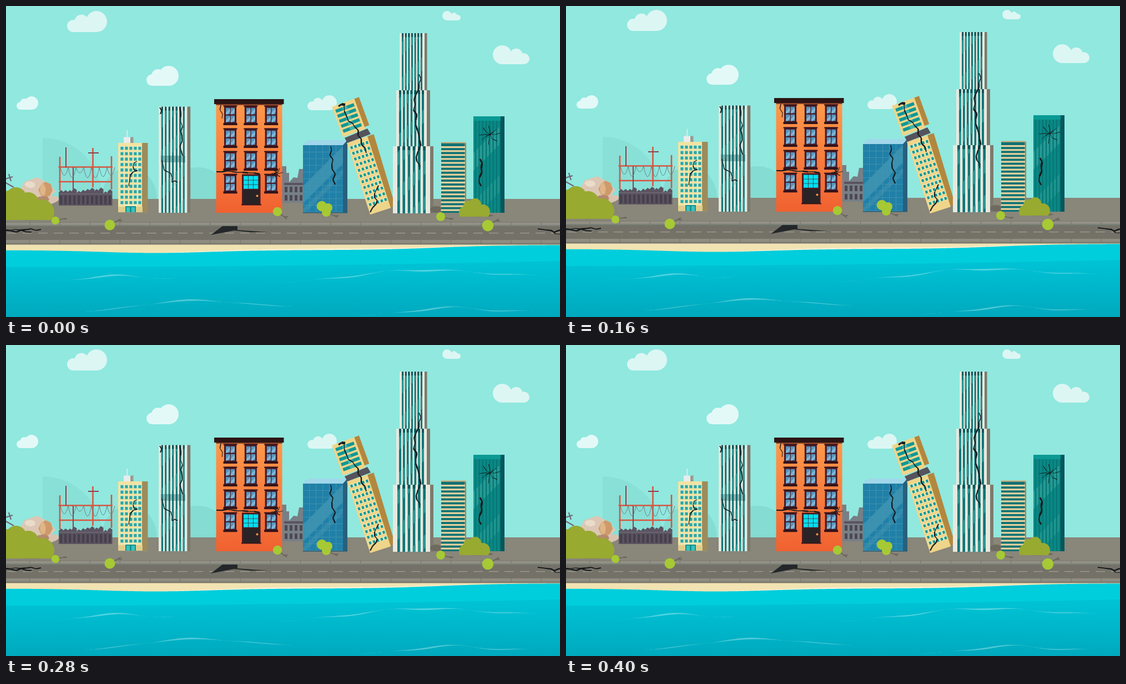
Recreate the animation shown at these times as an HTML page with a canvas. Size 998x561 px, loop 440 ms.

```html
<!DOCTYPE html>
<html lang="en">
<head>
<meta charset="utf-8">
<title>Shaking city</title>
<style>
html, body { margin: 0; width: 100%; height: 100%; overflow: hidden; background: #90e8df; }
#stage { position: fixed; inset: 0; overflow: clip; contain: strict; }
canvas { position: absolute; left: -10px; top: -10px; display: block; }
</style>
</head>
<body>
<div id="stage"><canvas id="city" width="1018" height="581"></canvas></div>
<script>
const W = 998, H = 561, PAD = 10;
const city = document.getElementById('city');
const g = city.getContext('2d');
g.translate(PAD, PAD);

let seed = 11;
const rand = (a = 0, b = 1) => {
  seed = seed * 16807 % 2147483647;
  return a + (b - a) * seed / 2147483647;
};
const rect = (x, y, w, h, c) => { g.fillStyle = c; g.fillRect(x, y, w, h); };
const band = (y, h, c) => rect(-PAD, y, W + 2 * PAD, h, c);
const fill = (d, c) => { g.fillStyle = c; g.fill(new Path2D(d)); };
const line = (d, c, w = 1) => { g.strokeStyle = c; g.lineWidth = w; g.stroke(new Path2D(d)); };
const disc = (x, y, r, c, ry = r) => {
  g.fillStyle = c;
  g.beginPath(); g.ellipse(x, y, r, ry, 0, 0, 7); g.fill();
};
const fade = (y0, y1, a, b) => {
  const f = g.createLinearGradient(0, y0, 0, y1);
  f.addColorStop(0, a); f.addColorStop(1, b);
  return f;
};
const clip = (x, y, w, h, draw) => {
  g.save(); g.beginPath(); g.rect(x, y, w, h); g.clip(); draw(); g.restore();
};
const tilted = (x, y, deg, draw) => {
  g.save(); g.translate(x, y); g.rotate(deg * Math.PI / 180); draw(); g.restore();
};
const grid = (x, y, cols, rows, dx, dy, draw) => {
  for (let r = 0; r < rows; r++)
    for (let c = 0; c < cols; c++) draw(x + c * dx, y + r * dy, c, r);
};
// Diagonal strip of reflected light.
const glint = (x, y, w, rise, h, c) =>
  fill(`M${x} ${y}l${w} ${-rise}v${h}l${-w} ${rise}Z`, c);

// Jagged fracture through a few key points given as x, y pairs.
function crack(width, ...p) {
  let [x, y] = p;
  for (let i = 2; i < p.length; i += 2) {
    const dx = p[i] - p[i - 2], dy = p[i + 1] - p[i - 1], len = Math.hypot(dx, dy);
    const n = Math.max(2, Math.round(len / 9));
    for (let k = 1; k <= n; k++) {
      const off = k < n ? rand(-3.5, 3.5) / len : 0;
      const nx = p[i - 2] + dx * k / n - dy * off, ny = p[i - 1] + dy * k / n + dx * off;
      line(`M${x} ${y}L${nx} ${ny}`, '#15191c', width * rand(.6, 1.3));
      [x, y] = [nx, ny];
    }
  }
}

function cloud(x, y, w, h, flip, c = '#dcf6f3') {
  g.save();
  g.translate(flip ? x + w : x, y);
  if (flip) g.scale(-1, 1);
  const r = h * .29;
  rect(r, h - 2 * r, w - r - h / 2, 2 * r, c);
  disc(r, h - r, r, c);
  disc(w * .36, h * .5, h * .33, c);
  disc(w - h / 2, h / 2, h / 2, c);
  g.restore();
}

function sky() {
  band(-PAD, H + 2 * PAD, '#90e8df');
  clip(66, 230, 120, 120, () => disc(66, 348, 108, '#89e0d7', 110));
  disc(222, 348, 50, '#85dcd2', 57);
  disc(346, 348, 56, '#85dcd2', 57);
  cloud(110, 9, 72, 38);
  cloud(253, 108, 58, 36, false, '#e3f9f7');
  cloud(19, 163, 39, 24, false, '#e3f9f7');
  cloud(543, 161, 53, 27);
  cloud(786, 9, 33, 17, true);
  cloud(877, 71, 66, 34, true);
}

function ground() {
  band(348, 42, '#89867a');
  band(390, 6, '#939186');
  band(389.5, 1, '#7b796e');
  band(395.5, 1, '#68675e');
  band(396.5, 26, '#747268');
  band(422, 6, '#8f8d81');
  band(427.5, 3.5, '#7d7b70');
  for (let x = -12; x < W + PAD; x += 54.2) {
    rect(x, 390, 1, 6, '#75736a');
    rect(x, 422, 1, 8, '#75736a');
  }
  for (let x = 2; x < W; x += 28) rect(x, 409, 17, 1.2, '#a2a193');
  crack(2.6, -8, 410, 27, 404, 63, 403);
  crack(2, -4, 404, 27, 404, 46, 408);
  crack(2.4, 958, 402, 980, 405, 1006, 407);
  crack(1.6, 972, 404, 990, 411, 1006, 411);
  fill('M369 413L390 397H417V404L472 408H440L411 405Z', '#24272a');
}

function rock(x, y, rx, ry, c) {
  let d = '';
  for (let i = 0; i < 8; i++) {
    const a = i * Math.PI / 4, k = rand(.82, 1.1);
    d += `${i ? 'L' : 'M'}${x + Math.cos(a) * rx * k} ${y + Math.sin(a) * ry * k}`;
  }
  fill(d + 'Z', c);
}

function rubble() {
  line('M-2 318L14 327M5 303L9 316M-1 312L12 308', '#6f6873', 2.2);
  rock(56, 334, 31, 23, '#dcc7b4');
  rock(44, 322, 10, 6, '#eadcca');
  rock(80, 349, 17, 8, '#d9c3b0');
  rock(71, 332, 12, 14, '#cf9a6b');
  rock(66, 331, 6, 12, '#e0b587');
  rock(66, 349, 13, 7, '#b28b6c');
}

function wreck() {
  const red = '#d9553f', dark = '#8d414d';
  line('M94.5 290.5H192M95 317H190M97 272V333M156.5 256V327M190 271V331', red, 2.6);
  line('M108 255V291M121 291V331M148 265H167', dark, 2);
  for (let x = 98; x < 185; x += 14)
    line(`M${x} 291q7 ${rand(18, 38)} 14 0`, '#637b80', .9);
  for (let x = 95; x < 191; x += 8) {
    const top = x < 112 ? 332 : rand(325, 335);
    fill(`M${x} 360V${top + 4}L${x + 4} ${top}L${x + 8.5} ${top + 3}V360Z`, '#5b5460');
    rect(x + 2, 342, 4.3, 16, '#46404c');
  }
  rect(95, 338, 96, 1.5, '#6d6874');
}

function ruins() {
  fill('M497 355V289H505V301H510V318L518 309 525 310 528 294H537V355Z', '#777f86');
  rect(501, 319, 34, 4, '#5a5360');
  grid(502, 326, 4, 2, 9, 15, (x, y) => rect(x, y, 5, 10, '#4d4854'));
}

function hotel() {
  rect(217.5, 224, 1.5, 14, '#e7eded');
  rect(212, 236.5, 12, 11, '#e7eded');
  rect(224, 236.5, 5.5, 11, '#989c91');
  rect(202, 247, 44, 127, '#f3e3a2');
  rect(245, 247, 10.5, 127, '#9e8b5c');
  grid(205.5, 253, 5, 11, 8, 9.8, (x, y) => {
    rect(x, y, 6, 6.4, '#dcf1da');
    rect(x + .8, y + .8, 5.2, 5.6, '#2ca6a4');
  });
  rect(202, 362, 44, 12, '#dfcd8d');
  rect(213, 358, 23, 3, '#f7edc0');
  rect(215, 361, 19, 13, '#16918f');
  grid(217, 363, 2, 1, 9, 0, (x, y) => rect(x, y, 6, 11, '#3ac1bc'));
  rect(202, 372, 53, 2, '#8f8c7c');
  crack(1.6, 236, 280, 229, 290, 237, 297, 224, 305, 221, 325);
}

// Tower tier: n dark glass strips between pale ribs.
function tier(x, y, w, h, side, n, edge, rib) {
  const step = (w - 2 * edge + rib) / n, strip = step - rib;
  rect(x, y, w, h, '#e6e9df');
  rect(x + w, y, side, h, '#7d7a6d');
  for (let i = 0; i < n; i++) {
    const sx = x + edge + i * step;
    clip(sx, y, strip, h, () => {
      rect(sx, y, strip, h, '#0f7577');
      for (let k = 20; k < h + w; k += 64) glint(x, y + k, w, w, 24, '#2b9692');
      rect(sx, y, strip, 7, '#07575b');
    });
  }
}

function ribTower() {
  tier(275, 181.5, 51.5, 191.5, 5.7, 7, 4.6, 3.1);
  rect(279, 270, 44, 12, 'rgba(7, 87, 91, .35)');
  crack(1.5, 277, 183, 278, 195);
  crack(1.8, 313, 183, 315, 226, 318, 270);
  crack(1.5, 281, 278, 285, 296, 297, 302, 299, 318, 309, 318);
}

function sash(x, y) {
  rect(x, y, 22, 34, '#4a1a26');
  rect(x - 1.5, y, 25, 2, '#33131b');
  grid(x + 3, y + 4, 2, 2, 8.6, 14, (px, py) => clip(px, py, 7.4, 12, () => {
    rect(px, py, 8, 12, '#5594bd');
    glint(px, py + 9, 8, 8, 6, '#82b5d4');
  }));
  rect(x - 1.5, y + 31.5, 25, 4, '#33131b');
}

function brownstone() {
  rect(378.5, 177, 119, 196, fade(178, 373, '#ff994a', '#f06130'));
  rect(378.5, 177, 119, 2, '#8d4329');
  rect(375, 168, 125.5, 9, '#2c1514');
  grid(393, 179.5, 3, 4, 36.8, 41.1, (x, y, c, r) => { if (r < 3 || c !== 1) sash(x, y); });
  rect(425, 303.5, 33.5, 55.5, '#4a1a22');
  grid(428, 306.5, 3, 3, 9, 8, (x, y) => rect(x, y, 8.3, 7.3, '#00dff0'));
  rect(428, 332, 28, 26, '#292326');
  disc(452.5, 342.5, 2, '#ff9644');
  rect(424, 357.5, 36, 2, '#35161b');
  crack(2.2, 379, 299, 426, 300, 457, 303);
  crack(1.4, 387, 179, 389, 203);
  star(487, 301, 11);
}

function star(x, y, r) {
  for (let i = 0; i < 8; i++) {
    const a = i * Math.PI / 4 + rand(-.2, .2), k = r * rand(.7, 1.1);
    crack(1, x, y, x + Math.cos(a) * k, y + Math.sin(a) * k);
  }
}

function blueBlock() {
  rect(535, 251, 72.5, 122, '#2180a7');
  fill('M535 251L543 242H615L607 251Z', '#a0d7ea');
  fill('M607 251L615 242V373H607Z', '#285f7c');
  clip(535, 251, 72, 122, () => {
    glint(535, 325, 85, 85, 31, '#3a91b0');
    glint(535, 366, 85, 85, 11, '#338aab');
    for (let x = 546; x < 606; x += 12) rect(x, 251, .8, 122, '#4395b3');
    for (let y = 263; y < 372; y += 12) rect(535, y, 72, .8, '#4395b3');
  });
  rect(535, 372, 80, 1.5, '#255b70');
  crack(2, 585, 253, 587, 285, 593, 322);
}

function leaning() {
  const front = '#efd589', side = '#b2873f', glass = '#109896';
  tilted(614, 247, -18, () => {
    fill('M38 0H51L48 132L38 136Z', side);
    rect(0, 0, 39, 136, front);
    grid(2.5, 7, 5, 11, 7.3, 10.8, (x, y) => {
      rect(x, y, 5.6, 6.8, '#fcf5cd');
      rect(x + 1, y + 1, 4.2, 5.2, glass);
    });
  });
  fill('M610 238L651 221L657 231L615 247Z', '#55535b');
  tilted(587, 182, -20, () => {
    rect(42, 0, 10, 54, side);
    rect(0, 0, 43, 58, front);
    grid(4, 7, 1, 5, 0, 9.6, (x, y) => {
      rect(x, y, 35, 5.8, glass);
      rect(x + 13, y, 9, 5.8, '#42b4ac');
    });
  });
  crack(4, 599, 181, 611, 178);
  crack(2, 609, 179, 614, 200, 628, 218, 640, 240, 649, 265);
  crack(1.8, 671, 324, 664, 346, 667, 357, 656, 372);
}

function skyscraper() {
  tier(709, 49, 45, 103, 4.5, 7, 4, 2.3);
  tier(703, 152, 55, 101, 6, 7, 5, 2.8);
  tier(697, 253, 67, 121, 6, 6, 8, 4.4);
  crack(2.4, 744, 123, 744, 149, 735, 169, 738, 215, 747, 252, 739, 273, 745, 295);
}

function slats() {
  disc(775, 367, 11, '#6d6a60', 6);
  rect(784, 246, 42.5, 127, '#0f7274');
  rect(826, 247, 3, 126, '#9b835c');
  grid(783.5, 253, 1, 17, 0, 7.1, (x, y) => rect(x, y, 43.5, 3.2, '#e8d29e'));
  rect(783.5, 245.5, 45, 2.2, '#c9ac78');
}

function tealTower() {
  rect(842, 199, 49.5, 174, '#0a8986');
  rect(891, 199, 7, 174, '#04575c');
  clip(842, 207, 49, 166, () => {
    glint(842, 265, 50, 50, 32, '#259b95');
    glint(842, 353, 50, 50, 30, '#1b958f');
    for (let x = 845; x < 890; x += 6.3) rect(x, 207, 2.2, 166, '#087572');
  });
  rect(842, 199, 49, 8, '#0a9994');
  star(872, 232, 18);
  crack(3, 854, 276, 857, 300, 853, 309, 856, 325);
}

function ball(x, y, r, dx, dy) {
  line(`M${x} ${y}l${dx} ${dy}m${-dx * .3} ${-dy * .3}l${dx * .4} 0`, '#68645d', 1.7);
  disc(x, y, r, '#a6c934');
}

// Bush with a flat foot: circular lobes along a row.
function bush(x0, x1, foot, lobes) {
  disc((x0 + x1) / 2 + 6, foot - 2, (x1 - x0) / 2, '#6d6a60', 2.3);
  clip(x0, foot - 80, x1 - x0, 80, () =>
    lobes.forEach(([x, y, r]) => disc(x, y, r, '#98aa30')));
}

function plants() {
  bush(-PAD, 87, 386, [[18, 346, 19], [40, 355, 19], [64, 372, 23], [5, 366, 33], [38, 374, 24]]);
  bush(816, 872, 380, [[845, 358, 11], [833, 360, 9], [829, 373, 13], [859, 371, 13], [845, 371, 14]]);
  ball(89, 387, 7.2, 19, -4);
  ball(187, 395, 9.5, 20, -11);
  ball(489, 371, 8.2, 17, 13);
  ball(783, 380, 8, 21, 5);
  ball(868, 396, 10.3, 20, -12);
  ball(577, 372, 8, 20, 9);
  disc(569, 361, 9.3, '#a6c934');
  disc(580, 364, 8, '#a6c934');
}

const bump = (x, mid, width) => Math.exp(-(((x - mid) / width) ** 2));

// Area between two curves of x.
function ribbon(x0, x1, top, bottom, c) {
  g.fillStyle = c;
  g.beginPath();
  for (let x = x0; x <= x1; x += 3) g.lineTo(x, top(x));
  for (let x = x1; x >= x0; x -= 3) g.lineTo(x, bottom(x));
  g.fill();
}

// Thin crest from one end to the other, rising in the middle.
function wave(x0, y0, x1, y1, rise, width) {
  const at = x => (x - x0) / (x1 - x0);
  const top = x => y0 + (y1 - y0) * at(x) - rise * bump(at(x), .5, width) + Math.sin(x / 19);
  const thick = x => Math.sin(Math.PI * at(x)) * (1.6 + 1.4 * Math.sin(x / 23));
  ribbon(x0, x1, top, x => top(x) + thick(x), 'rgba(205, 245, 245, .38)');
}

function sea() {
  const shore = x => 440.5 + 5 * bump(x, 270, 140) - 9.5 / (1 + Math.exp((780 - x) / 60));
  const floor = () => H + PAD;
  band(430.5, 20, '#f2e3b2');
  ribbon(250, 880, x => shore(x) - 2.5 * Math.sin((x - 250) / 630 * Math.PI), shore, '#f5f2da');
  ribbon(-PAD, W + PAD, shore, floor, '#00cedc');
  ribbon(-PAD, W + PAD, x => 471 - 11 * (Math.max(x, 0) / W) ** 2, floor, fade(465, H, '#00c2d5', '#00a9be'));
  wave(75, 497, 303, 491, 9, .25);
  wave(494, 500, 980, 487, 18, .31);
  wave(135, 551, 525, 541, 16, .28);
  wave(636, 558, 948, 550, 11, .25);
}

[sky, ground, rubble, wreck, ruins, hotel, ribTower, brownstone, blueBlock, leaning,
 skyscraper, slats, tealTower, plants, sea].forEach(draw => draw());

// Camera shake: one jolt per 40 ms step, sideways on every third.
const lift = [0, 1, 0, 1, 2, 1, 0, 1, 0, 0, 1];
const keys = [...lift, 0].map((up, i) => ({
  transform: `translate(${i % 3 === 2 && i < lift.length ? 1 : 0}px, ${-up}px)`,
  offset: i / lift.length,
  easing: 'steps(1, end)'
}));
city.animate(keys, { duration: 40 * lift.length, iterations: Infinity });
</script>
</body>
</html>
```
